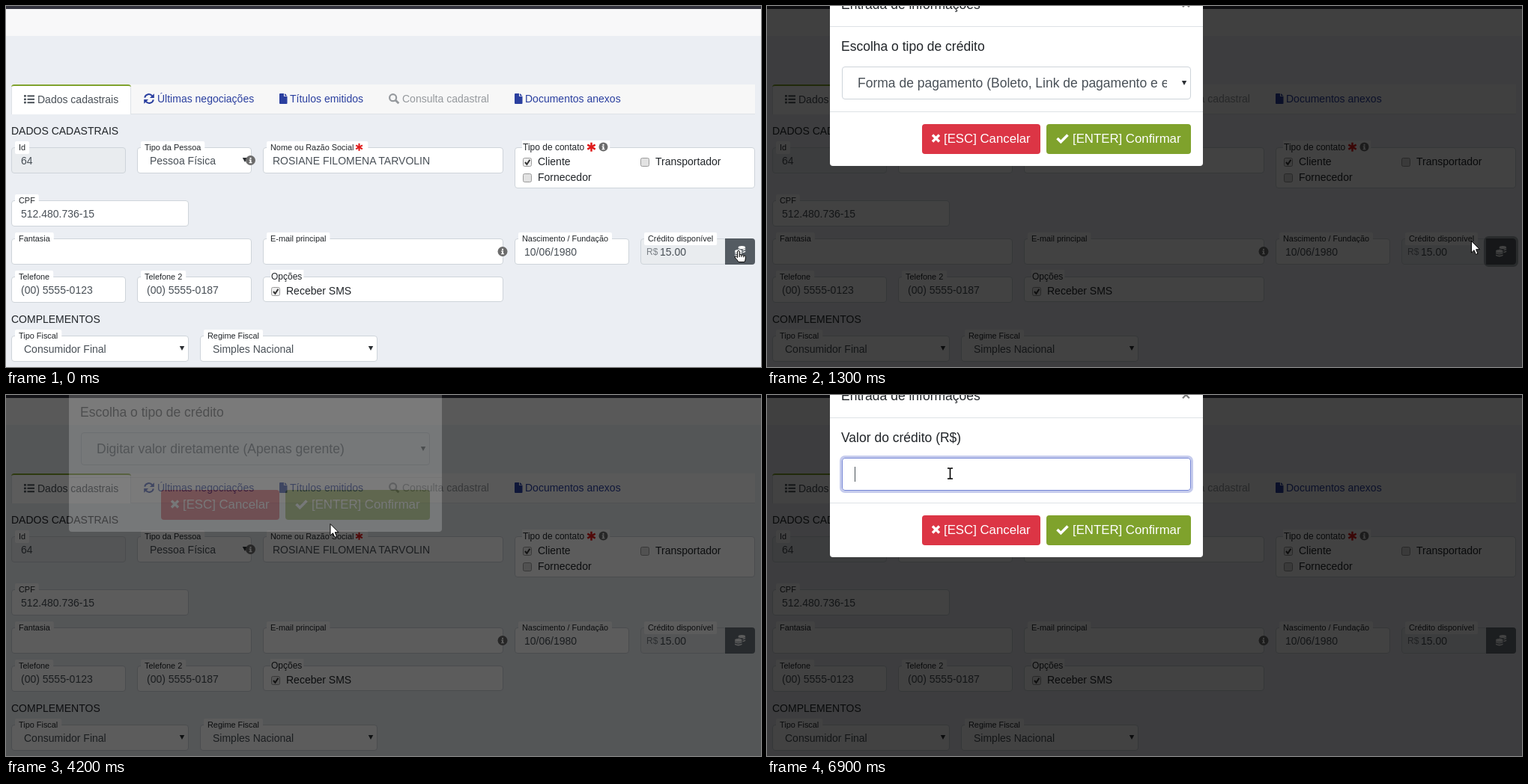
These frames come from a looping animation (1008 by 483 pixels, 8000 ms). An HTML page:

```html
<!DOCTYPE html>
<html lang="pt-BR">
<head>
<meta charset="utf-8">
<title>Dados cadastrais</title>
<style>
html, body { margin: 0; width: 100%; height: 100%; overflow: hidden; background: #ebeef3; }
svg { display: block; }
text { font-family: "Liberation Sans", Arial, sans-serif; white-space: pre; }
</style>
</head>
<body>
<svg id="stage" width="100%" height="100%" viewBox="0 0 1008 483"></svg>
<script>
const INK = '#212529', SOFT = '#495057', LINK = '#2a3f9f', MUTED = '#95999d';
const EDGE = '#ced4da', GREEN = '#7fa22c', RED = '#dc3545', LOCKED = '#e9ecef';

const pen = document.createElement('canvas').getContext('2d');
const widthOf = (s, size) => {
  pen.font = `${size}px "Liberation Sans", Arial, sans-serif`;
  return pen.measureText(s).width;
};

// Basic shapes
const text = (x, y, s, fill = INK, size = 14) =>
  `<text x="${x}" y="${y}" font-size="${size}" fill="${fill}">${s}</text>`;
const rect = (x, y, w, h, fill, more = '') =>
  `<rect x="${x}" y="${y}" width="${w}" height="${h}" fill="${fill}" ${more}/>`;
const box = (x, y, w, h, fill = '#fff', edge = EDGE) =>
  rect(x + .5, y + .5, w - 1, h - 1, fill, `rx="3.5" stroke="${edge}"`);
const path = (d, fill, more = '') => `<path d="${d}" fill="${fill}" ${more}/>`;
const line = (d, color, w, more = '') =>
  path(d, 'none', `stroke="${color}" stroke-width="${w}" ${more}`);
const move = (x, y, s) => `<g transform="translate(${x} ${y})">${s}</g>`;

// Form parts
const label = (x, y, s, extra = 0) =>
  rect(x - 5, y - 12, widthOf(s, 10.9) + 10 + extra, 17, '#fff', 'rx="2"') + text(x, y, s, INK, 10.9);
const field = (x, y, w, name, value = '', o = {}) =>
  box(x, y, w, 35, o.fill) + label(x + 10, y + 4, name, o.extra) +
  text(x + (o.pad || 13), y + 23, value, SOFT);
const legend = (x, y, s, extra = 0) =>
  rect(x - 1, y - 13, widthOf(s, 12) + 3 + extra, 17, '#fff') + text(x, y, s, INK, 12);
const arrow = (x, y) => path(`M${x - 3.2} ${y - 3}h6.4l-3.2 6z`, '#2b2f33');
const check = (x, y, name, on) =>
  rect(x + .5, y + .5, 11, 11, on ? '#efefef' : '#e2e2e2', 'rx="2" stroke="#9b9b9b"') +
  (on ? line(`M${x + 3} ${y + 6}l2.4 2.8 4-6`, '#333', 2) : '') +
  text(x + 20, y + 10, name);

// Icons
const info = (x, y, r = 6.5) =>
  `<circle cx="${x}" cy="${y}" r="${r}" fill="#6b6b6b"/>` +
  rect(x - 1, y - 3.7, 2, 2, '#fff') +
  path(`M${x - 1.8} ${y - 1}h2.8v3.4h.9v1.3h-3.8v-1.3h.9v-2.1h-.8z`, '#fff');
const star = (x, y, r) => move(x, y, [0, 60, 120].map(a =>
  line(`M0 ${-r}V${r}`, '#e01b1b', r * .42, `transform="rotate(${a})"`)).join(''));
const listIcon = [0, 1, 2].map(i =>
  rect(24, 119 + i * 4.4, 2.8, 2.8, SOFT, 'rx=".8"') +
  rect(28.5, 119.4 + i * 4.4, 9.5, 2, SOFT)).join('');
const syncHalf = line('M-5.8 -1.4A5.6 5.6 0 0 1 4.2 -3.6', LINK, 2) + path('M6.8 -6.8V-.9H.9z', LINK);
const syncIcon = move(191, 124, syncHalf + `<g transform="rotate(180)">${syncHalf}</g>`);
const fileIcon = x => move(x, 117, path('M1 0H6V4H10.5V13Q10.5 14 9.5 14H1Q0 14 0 13V1Q0 0 1 0z M7 0L10.5 3.2H7z', LINK));
const searchIcon = `<circle cx="516.6" cy="122.7" r="4.5" fill="none" stroke="${MUTED}" stroke-width="2.2"/>` +
  line('M520 126L524.3 130.3', MUTED, 2.8);
const stack = (x, y, n) => `<ellipse cx="${x}" cy="${y}" rx="4.8" ry="2" fill="#fff"/>` +
  Array.from({ length: n }, (_, i) =>
    path(`M${x - 4.8} ${y + 1.5 + i * 3}q4.8 2.6 9.6 0v1.6q-4.8 2.6 -9.6 0z`, '#fff')).join('');
const coins = stack(982.4, 323, 2) + rect(972.4, 325.4, 11.2, 10, 'var(--btn)') + stack(977.8, 328, 2);

const page =
  rect(0, 0, 1008, 483, '#ebeef3') + rect(0, 0, 1008, 40, '#f8f8f9') + rect(0, 0, 1008, 4, '#33333e') +
  rect(7, 105, 993, 40, '#f7f7f7') + rect(7, 144, 993, 1, '#dee2e6') +
  path('M7.5 145V109Q7.5 105.5 11 105.5H163Q166.5 105.5 166.5 109V145', '#fff', 'stroke="#dee2e6"') +
  path('M7 108Q7.5 105 11 105H163Q166.5 105 167 108Q166 107 163 107H11Q8 107 7 108z', GREEN) +
  listIcon + text(42, 130, 'Dados cadastrais', SOFT) +
  syncIcon + text(202, 129, 'Últimas negociações', LINK) +
  fileIcon(365) + text(379, 129, 'Títulos emitidos', LINK) +
  searchIcon + text(529, 129, 'Consulta cadastral', MUTED) +
  fileIcon(679) + text(693, 129, 'Documentos anexos', LINK) +
  text(7, 172, 'DADOS CADASTRAIS') +
  field(7, 189, 153, 'Id', '64', { fill: LOCKED }) +
  field(175, 189, 153, 'Tipo da Pessoa', 'Pessoa Física', { pad: 17 }) + arrow(319, 206) + info(326.5, 206.5) +
  field(343, 189, 321, 'Nome ou Razão Social', 'ROSIANE FILOMENA TARVOLIN', { extra: 14 }) + star(471.5, 188.8, 5) +
  box(679, 189, 321, 55) + legend(690, 193, 'Tipo de contato', 32) + star(781.5, 188.7, 6) + info(797.5, 188.5, 6) +
  check(690, 203, 'Cliente', true) + check(847, 203, 'Transportador') + check(690, 224, 'Fornecedor') +
  field(7, 260, 237, 'CPF', '512.480.736-15') +
  field(7, 311, 321, 'Fantasia') +
  field(343, 311, 321, 'E-mail principal') + info(663, 328.5) +
  field(679, 311, 153, 'Nascimento / Fundação', '10/06/1980') +
  field(847, 311, 115, 'Crédito disponível', '15.00', { fill: LOCKED, pad: 26 }) + text(855, 333, 'R$', '#7b8187', 12) +
  `<g id="coin">` + rect(958.5, 309.5, 43, 38, 'none', 'id="ring" rx="5" stroke="#6c757d" stroke-opacity=".6" stroke-width="3"') +
  path('M960 311H996Q1000 311 1000 315V342Q1000 346 996 346H960z', 'var(--btn)') + coins + '</g>' +
  field(7, 362, 153, 'Telefone', '(00) 5555-0123') +
  field(175, 362, 153, 'Telefone 2', '(00) 5555-0187') +
  box(343, 362, 321, 34) + legend(354, 366, 'Opções') + check(354, 376, 'Receber SMS', true) +
  text(7, 424, 'COMPLEMENTOS') +
  field(7, 441, 237, 'Tipo Fiscal', 'Consumidor Final', { pad: 17 }) + arrow(235, 458) +
  field(259, 441, 237, 'Regime Fiscal', 'Simples Nacional', { pad: 17 }) + arrow(487, 458);

const options = ['Forma de pagamento (Boleto, Link de pagamento e etc)', 'Digitar valor diretamente (Apenas gerente)'];
const big = (x, y, s, fill, id = '') => `<g id="${id}">${text(x, y, s, fill, 17.5)}</g>`;

const modal =
  path('M84 -60H582V213Q582 217 578 217H88Q84 217 84 213z', '#fff') +
  big(99, 7, 'Entrada de informações', INK) +
  line('M555 -4.5L563.8 4.3M563.8 -4.5L555 4.3', '#7d7d7d', 2.2) +
  rect(84, 30, 498, 1, '#dee2e6') + rect(84, 144, 498, 1, '#dee2e6') +
  rect(98.5, 82.5, 469, 47, 'none', 'id="glow" rx="5.5" stroke="#c6cced" stroke-width="3"') +
  rect(100.5, 84.5, 465, 43, '#fff', 'id="input" rx="3.5"') +
  '<g id="choose">' + big(99, 63, 'Escolha o tipo de crédito', INK) +
  '<svg x="121" y="84" width="413" height="44">' +
  options.map((s, i) => big(0, 28, s, SOFT, 'opt' + i)).join('') + '</svg>' + arrow(557, 106) + '</g>' +
  '<g id="amount">' + big(99, 63, 'Valor do crédito (R$)', INK) + big(116.5, 112, '0', SOFT, 'zero') +
  rect(0, 96, 1, 20, SOFT, 'id="caret"') + '</g>' +
  rect(207, 161, 158, 40, RED, 'rx="4"') + line('M221 175.5L230 184.5M230 175.5L221 184.5', '#fff', 3.4) +
  text(236, 186, '[ESC] Cancelar', '#fff', 16.8) +
  rect(373, 161, 193, 40, GREEN, 'id="ok" rx="4"') + line('M387.5 180L392.3 184.7L401.5 175.5', '#fff', 3.6) +
  text(408, 186, '[ENTER] Confirmar', '#fff', 16.8) +
  '<g id="menu">' + rect(99.5, 128.5, 486, 60, '#fff', 'stroke="#a9a9a9"') +
  rect(100, 0, 485, 29.5, '#d6d9de', 'id="pick"') +
  options.map((s, i) => big(121, 149 + i * 30, s, SOFT)).join('') + '</g>';

const outline = 'stroke="#000" stroke-linejoin="round"';
const cursors = {
  arrow: path('M.5 .5V16L4 12.7L6.4 18.4L9 17.3L6.7 11.7H11.5z', '#fff', outline),
  hand: path('M-1.3 1Q0 -.5 1.3 1V6Q3 4.8 4 6.5Q6 5.3 6.8 7Q9.2 6.3 9.3 8.5V11Q9.2 13 8 15.5H0Q-1 13.5 -4.4 10Q-5.8 7.5 -3.5 7.8L-1.3 9.5z', '#fff', outline) +
    line('M1.3 6V9M4 6.5V9M6.8 7V9.3', '#000', 1),
  beam: line('M-4 -7H-1Q0 -7 0 -6Q0 -7 1 -7H4M-4 7H-1Q0 7 0 6Q0 7 1 7H4M0 -6.5V6.5', '#fff', 3.4) +
    line('M-3.5 -7H-1Q0 -7 0 -6Q0 -7 1 -7H3.5M-3.5 7H-1Q0 7 0 6Q0 7 1 7H3.5M0 -6.5V6.5', '#000', 1.6)
};

stage.innerHTML = page + rect(0, 0, 1008, 483, '#000', 'id="shade"') + `<g id="modal">${modal}</g>` +
  '<g id="cursor">' + Object.keys(cursors).map(k => `<g id="${k}">${cursors[k]}</g>`).join('') + '</g>';
const $ = id => document.getElementById(id);
const show = (id, on) => { $(id).style.display = on ? '' : 'none'; };
const set = (id, name, v) => $(id).setAttribute(name, v);

// Stepped tracks: time, then values held until the next row
const shade = [[0, 0], [1000, .25], [1100, .48], [1200, .64], [1300, .74], [4200, .64], [4400, .32], [4500, .49], [4700, .74]];
const panel = [[0, 0, -50], [1100, .35, -41], [1200, .9, -12], [1300, 1, -3], [1400, 1, 0],
  [4200, .2, -34], [4400, 0, -50], [4700, .92, -5], [4900, 1, 0]];
const pointer = [
  [0, 'hand', 978, 327], [900, 'arrow', 976.5, 327], [1300, 'arrow', 940, 314], [1400, 'arrow', 850, 280],
  [1500, 'arrow', 730, 232], [1600, 'arrow', 620, 196], [1700, 'hand', 545, 174], [1800, 'arrow', 478, 124],
  [1900, 'arrow', 449.5, 95], [2200, 'arrow', 447, 118], [2300, 'arrow', 441, 143], [2400, 'arrow', 434, 166],
  [2500, 'arrow', 432.5, 172], [4400, 'arrow', 385, 144], [4500, 'hand', 356, 119], [4700, 'arrow', 338, 130],
  [4900, 'arrow', 320, 140], [5100, 'beam', 253, 113], [5300, 'beam', 247, 107], [5400, 'beam', 244.5, 105]
];
const at = (track, t) => track.findLast(row => row[0] <= t);
const within = (t, a, b) => t >= a && t < b;

function draw(t) {
  const [, alpha, dy] = at(panel, t);
  const [, kind, x, y] = at(pointer, t);
  const focus = within(t, 1400, 4200) || t >= 4700;
  const second = t >= 4400;

  set('shade', 'opacity', at(shade, t)[1]);
  set('modal', 'opacity', alpha);
  set('modal', 'transform', `translate(0 ${dy})`);
  $('coin').style.setProperty('--btn', t < 1400 ? '#545b62' : '#6c757d');
  show('ring', within(t, 900, 1400));
  show('glow', focus);
  set('input', 'stroke', focus ? '#7586d6' : EDGE);
  set('ok', 'fill', within(t, 1700, 1800) ? '#698625' : GREEN);

  show('choose', !second);
  show('amount', second);
  show('opt0', t < 2500);
  show('opt1', t >= 2500);
  show('menu', within(t, 2100, 2500));
  set('pick', 'y', t < 2400 ? 129 : 159);
  show('zero', t < 6900);
  set('caret', 'x', within(t, 5400, 6900) ? 127 : 117);

  set('cursor', 'transform', `translate(${x} ${y})`);
  for (const k in cursors) show(k, k === kind);
}

const start = performance.now();
function tick() {
  draw((performance.now() - start) % 8000);
  requestAnimationFrame(tick);
}
tick();
</script>
</body>
</html>
```
